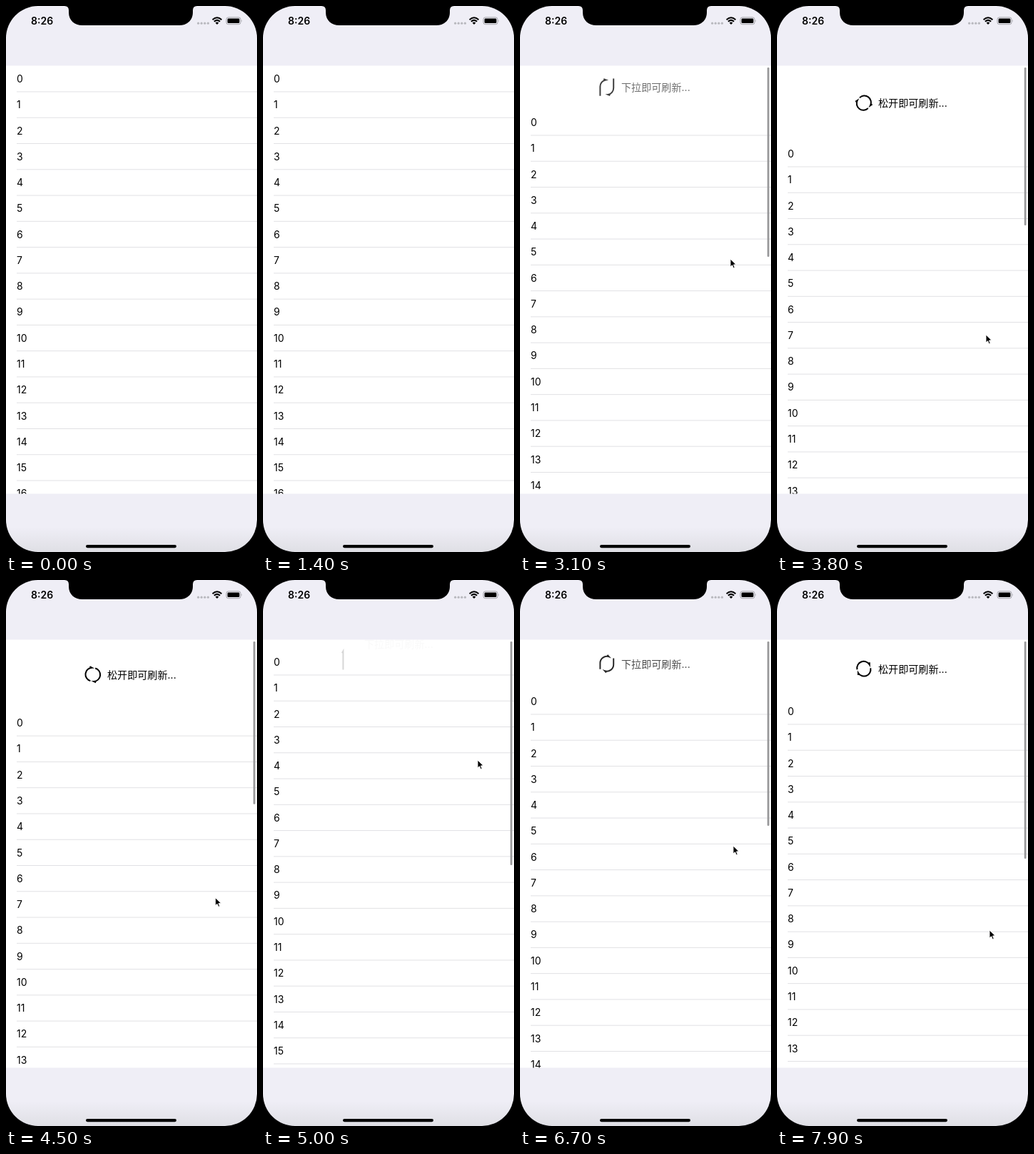
Animation of 352x764 px, one loop 8000 ms. Source, as an HTML page:

```html
<!DOCTYPE html>
<html lang="zh">
<head>
<meta charset="utf-8">
<title>Pull to refresh</title>
<style>
html, body { margin: 0; width: 100%; height: 100%; overflow: hidden; background: #000; }
svg { display: block; width: 352px; height: 764px; }
text { font-family: Inter, "Noto Sans CJK SC", "Noto Sans CJK", sans-serif; fill: #000; }
#rows text { font-size: 14px; }
#rows path { stroke: #e1e1e4; }
#prompt { font-size: 14.1px; }
#icon path { fill: none; stroke: #000; stroke-width: 2; }
</style>
</head>
<body>
<svg viewBox="0 0 352 764">
  <defs>
    <linearGradient id="bg" x1="0" y1="0" x2="0" y2="1">
      <stop offset="0" stop-color="#efeef6"/>
      <stop offset=".955" stop-color="#efeef6"/>
      <stop offset="1" stop-color="#dfdfe5"/>
    </linearGradient>
    <clipPath id="table"><rect y="83.5" width="352" height="599"/></clipPath>
  </defs>
  <rect width="352" height="764"/>
  <rect width="352" height="764" rx="45" fill="url(#bg)"/>
  <path d="M82 0Q88 0 88 6V9C88 20 96 27 107 27H243C254 27 262 20 262 9V6Q262 0 268 0Z"/>

  <text x="35" y="26" font-size="14" font-weight="600">8:26</text>
  <g fill="#b8b8be">
    <circle cx="269.6" cy="24.2" r="1.6"/><circle cx="274.2" cy="24.2" r="1.6"/>
    <circle cx="278.8" cy="24.2" r="1.6"/><circle cx="283.4" cy="24.2" r="1.6"/>
  </g>
  <g fill="none" stroke="#000" stroke-width="2">
    <path d="M289.6 19.2Q296 13.4 302.4 19.2"/>
    <path d="M291.9 21.8Q296 18 300.1 21.8"/>
  </g>
  <path d="M293.6 23.6Q296 21.6 298.4 23.6L296 26Z"/>
  <rect x="309" y="15.9" width="20" height="9.8" rx="2.8" fill="none" stroke="#a3a3a9"/>
  <rect x="310.6" y="17.5" width="16.8" height="6.6" rx="1.4"/>
  <path d="M330.3 19.2Q331.8 20.8 330.3 22.4Z" fill="#a3a3a9"/>

  <g clip-path="url(#table)">
    <rect y="83" width="352" height="600" fill="#fff"/>
    <g id="rows"></g>
    <g id="icon"><path id="up"/><path id="down"/></g>
    <text id="prompt" x="142"></text>
    <rect id="bar" x="346.8" y="86" width="2.7" rx="1.3" fill="#979799"/>
  </g>
  <rect x="112" y="754" width="127" height="4.2" rx="2.1"/>
  <path id="cursor" d="M0 0V11L2.6 8.7L4.3 12.7L6.2 11.9L4.5 8L8 7.7Z" stroke="#fff" stroke-width=".9"/>
</svg>
<script>
const LOOP = 8000, TOP = 83.7, ROW = 36.27, THRESHOLD = 81.5, INSET = 60;
const DRAG = 1900, RELEASE = 7450;
const CX = 121.8, R = 9.4, LINE = 26, GAP = 1, TRAVEL = 16, HEAD = 3.2;
const $ = id => document.getElementById(id);

// time, cursor x, cursor y, pull distance
const keys = [
  [1300, 362, 196, 0], [1700, 318, 232, 0], [1900, 318, 232, 0],
  [2100, 318, 258, 16], [3100, 295, 354, 61], [3430, 293, 400, 81.5],
  [3800, 293, 460, 105], [4400, 293, 460, 105], [5000, 301, 252, 13],
  [5300, 301, 252, 13], [5900, 303, 279, 22], [6400, 300, 352, 60],
  [6700, 299, 372, 68], [6900, 299, 372, 68], [7400, 298, 490, 113],
  [7450, 298, 490, 113], [7700, 298, 490, 82]
];

const slope = (i, c) =>
  keys[i] && keys[i + 1] ? (keys[i + 1][c] - keys[i][c]) / (keys[i + 1][0] - keys[i][0]) : 0;

function tangent(i, c) {
  const a = slope(i - 1, c), b = slope(i, c);
  return a * b > 0 ? 2 * a * b / (a + b) : 0;
}

// monotone cubic through the keys
function track(t, c) {
  const last = keys.length - 1;
  if (t <= keys[0][0]) return keys[0][c];
  if (t >= keys[last][0]) return keys[last][c];
  const i = keys.findIndex(k => k[0] > t) - 1;
  const p = keys[i], q = keys[i + 1], h = q[0] - p[0], u = (t - p[0]) / h;
  const s = u * u * (3 - 2 * u);
  return p[c] + (q[c] - p[c]) * s
    + h * tangent(i, c) * u * (1 - u) * (1 - u)
    - h * tangent(i + 1, c) * u * u * (1 - u);
}

// one arrow, relative to the icon centre; the other is its half turn
function arrow(p) {
  const early = Math.max(0, 1 - 2 * p), bend = Math.max(0, 2 * p - 1);
  const y = -GAP + early * TRAVEL, a = Math.PI * .9 * bend, d = Math.PI / 3 - a;
  const ex = -R * Math.cos(a), ey = y - R * Math.sin(a);
  return `M${-R} ${y + LINE * (1 - bend)}V${y}A${R} ${R} 0 0 1 ${ex} ${ey}` +
    `l${-HEAD * Math.cos(d)} ${HEAD * Math.sin(d)}`;
}

let rows = "";
for (let i = 0; i < 17; i++) {
  const y = TOP + i * ROW;
  rows += `<text x="15" y="${y + 23.3}">${i}</text><path d="M15 ${y + ROW}H352"/>`;
}
$("rows").innerHTML = rows;
$("down").setAttribute("transform", "rotate(180)");

function draw(t) {
  const pull = track(t, 3), p = Math.min(1, pull / THRESHOLD), full = p >= 1;
  const cy = 83.2 + pull / 2;
  const spin = full ? (t - (t < 5000 ? 3425 : 7320)) * .6 : 0;
  const path = arrow(p);

  $("rows").setAttribute("transform", `translate(0 ${pull})`);
  $("up").setAttribute("d", path);
  $("down").setAttribute("d", path);
  $("icon").setAttribute("transform", `translate(${CX} ${cy}) rotate(${spin})`);
  $("icon").setAttribute("opacity", p);

  $("prompt").textContent = full ? "松开即可刷新..." : "下拉即可刷新...";
  $("prompt").setAttribute("y", cy + 5.4);
  $("prompt").setAttribute("opacity", p * p);

  const over = pull - (t >= RELEASE ? INSET : 0);
  $("bar").setAttribute("height", 326 - over);
  $("bar").setAttribute("opacity", t >= DRAG ? 1 : 0);
  $("cursor").setAttribute("transform", `translate(${track(t, 1)} ${track(t, 2)})`);
}

const start = performance.now();
function tick() {
  const t = (performance.now() - start) % LOOP;
  draw(Math.floor(t / 100) * 100);
  requestAnimationFrame(tick);
}
tick();
</script>
</body>
</html>
```
